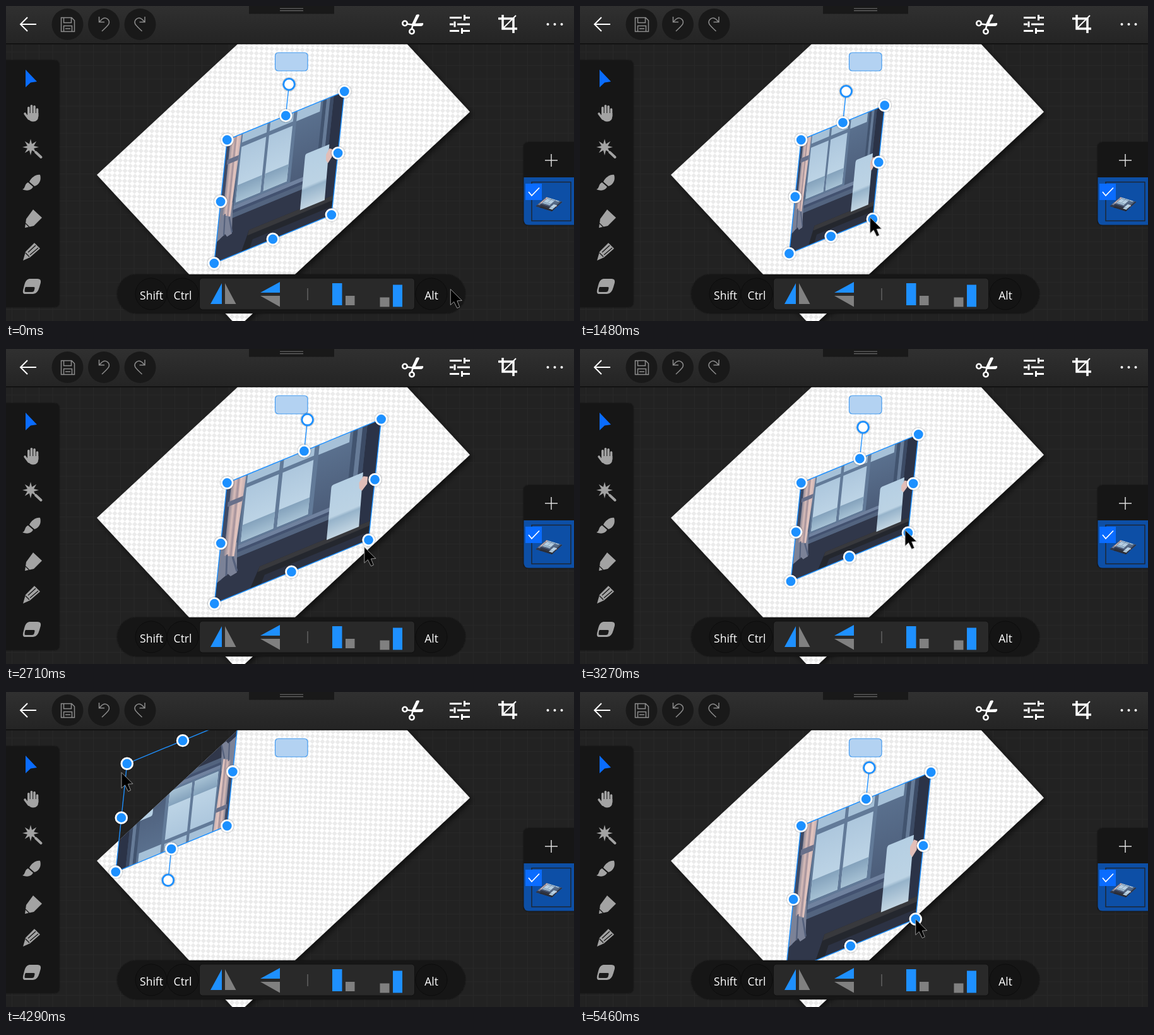
An HTML page for the animation above (5.61 s loop, 900x500 px).

```html
<!DOCTYPE html>
<html lang="en">
<head>
<meta charset="utf-8">
<title>Transform tool</title>
<style>
html, body { margin: 0; width: 100%; height: 100%; overflow: hidden; background: #222; }
svg { display: block; width: 900px; height: 500px; }
text { font: 17.5px "Open Sans", "Noto Sans", sans-serif; fill: #fff; text-anchor: middle; }
.line { fill: none; stroke: #fff; stroke-width: 3; }
.thin { fill: none; stroke: #8c8c8c; stroke-width: 1.5; }
.grey { fill: #a3a3a3; }
.blue { fill: #1e90ff; }
.mute { fill: #808080; }
.panel { fill: #191919; }
.dark { fill: none; stroke: #191919; stroke-width: 1.4; }
</style>
</head>
<body>
<svg viewBox="0 0 900 500">
<defs>
  <pattern id="grid" width="21.5" height="21.5" patternUnits="userSpaceOnUse" x="9" y="8">
    <rect width="21.5" height="21.5" fill="#222"/><path d="M0 .5H21.5M.5 0V21.5" stroke="#282828"/>
  </pattern>
  <pattern id="check" width="11.4" height="11.4" patternUnits="userSpaceOnUse" patternTransform="translate(144 268) rotate(-43)">
    <rect width="11.4" height="11.4" fill="#fff"/><path d="M0 0H5.7V11.4H11.4V5.7H0Z" fill="#ebebeb"/>
  </pattern>
  <linearGradient id="head" x2="0" y2="1"><stop stop-color="#303030"/><stop offset="1" stop-color="#242424"/></linearGradient>
  <linearGradient id="sky" x2="0" y2="1"><stop stop-color="#adc7dd"/><stop offset="1" stop-color="#c3d9e9"/></linearGradient>
  <linearGradient id="sea" x2="0" y2="1"><stop stop-color="#84a2bc"/><stop offset="1" stop-color="#a6c1d4"/></linearGradient>
  <linearGradient id="wall" x2="0" y2="1"><stop stop-color="#5c7391"/><stop offset=".6" stop-color="#4c5d79"/><stop offset="1" stop-color="#333b50"/></linearGradient>
  <linearGradient id="sheet" x2="0" y2="1"><stop stop-color="#b5cfe3"/><stop offset=".6" stop-color="#bcd3e4"/><stop offset=".66" stop-color="#96b3ca"/><stop offset="1" stop-color="#c2d5e2"/></linearGradient>
  <linearGradient id="pink"><stop stop-color="#8d8794"/><stop offset=".3" stop-color="#d9bdb9"/><stop offset=".5" stop-color="#a08f99"/><stop offset=".65" stop-color="#e6c7c0"/><stop offset="1" stop-color="#c3adb0"/></linearGradient>
  <filter id="shade" x="-20%" y="-20%" width="140%" height="140%"><feDropShadow dx="3" dy="4" stdDeviation="5" flood-opacity=".6"/></filter>
  <filter id="soft" x="-50%" y="-50%" width="200%" height="200%"><feDropShadow dx="0" dy="0" stdDeviation="1.3" flood-opacity=".55"/></filter>
  <path id="sheetEdge" d="M144 268L511.300 -73.700L735 168L367.700 509.700Z"/>
  <clipPath id="page"><use href="#sheetEdge"/></clipPath>
  <clipPath id="unit"><path d="M0 0H100V100H0Z"/></clipPath>
  <g id="art" clip-path="url(#unit)">
    <rect width="100" height="100" fill="url(#wall)"/>
    <path d="M0 68H100V100H0Z" fill="#30374a"/>
    <path d="M12 0H60V58H12Z" fill="#627a98"/>
    <path d="M13.500 0H34.500V7.500H13.500ZM37 0H57V7.500H37ZM60 0H80V8.500H60Z" fill="#a6c1d8"/>
    <path d="M13.500 11H34.500V56H13.500ZM37 11H57V56H37Z" fill="url(#sky)"/>
    <path d="M13.500 42H34.500V56H13.500ZM37 42H57V56H37Z" fill="url(#sea)"/>
    <path d="M12 58H73V61.500H12Z" fill="#70829f"/>
    <path d="M12 61.500H73V64H12Z" fill="#435270"/>
    <path d="M10 64H73V68H10Z" fill="#53647f"/>
    <path d="M82 0H85V66H82Z" fill="#42546f"/>
    <path d="M85 0H88V66H85Z" fill="#677c98"/>
    <path d="M88 0H91V70H88Z" fill="#3c4b65"/>
    <path d="M91 0H100V88H91Z" fill="#2b3347"/>
    <path d="M0 0H3V82H0Z" fill="#3d4a66"/>
    <path d="M0 55H11L13 81L9 82L7 79L0 83Z" fill="#7b8297"/>
    <path d="M3 0H12.500L10 66L3 62Z" fill="url(#pink)"/>
    <path d="M2 17H12L11.500 21H2Z" fill="#68708a"/>
    <path d="M9 66L13 80M5 62L6 80" fill="none" stroke="#55617c" stroke-width="1.200"/>
    <path d="M28 84H100V100H23Z" fill="#24272e"/>
    <path d="M28 84H100V88H27Z" fill="#38393d"/>
    <path d="M32 93H100V100H30Z" fill="#2c3243"/>
    <path d="M71 41.500Q71 39.500 72.500 39.500H91.500L92.500 85H71.500Z" fill="url(#sheet)"/>
    <path d="M89.500 47L92 43L95 45V51L92 55L90 52Z" fill="#e2beb8"/>
  </g>
  <g id="key"><circle r="25" fill="#141414" stroke="#0d0d0d"/></g>
</defs>

<rect width="900" height="500" fill="url(#grid)"/>
<use href="#sheetEdge" fill="url(#check)" filter="url(#shade)"/>
<rect x="426.500" y="74" width="51.500" height="29" rx="5" fill="#b3d2f2" stroke="#459cf0" stroke-width="1.200"/>

<g clip-path="url(#page)"><use href="#art" id="image"/></g>
<path id="frame" fill="none" stroke="#1e90ff" stroke-width="1.400"/>
<g id="knobs" filter="url(#soft)"></g>

<rect width="900" height="60" fill="url(#head)"/>
<path d="M0 60H900" stroke="#0c0c0c" stroke-width="1.600"/>
<path d="M385 0H520V12.500H385Z" class="panel"/>
<path d="M434 4H471M434 7.500H471" stroke="#777" stroke-width="1.200"/>
<path d="M48 29H23M34 18L23 29L34 40" class="line" style="stroke-width:2"/>
<g class="panel"><circle cx="97.500" cy="29" r="25"/><circle cx="155" cy="29" r="25"/><circle cx="212.500" cy="29" r="25"/></g>
<path class="thin" d="M87.500 18.500H104L108.500 23V40.500H87.500ZM91.500 18.500V26.500H103.500V18.500M91.500 40.500V31.500H104.500V40.500M94 36H102"/>
<path id="undo" class="thin" d="M147.500 17V25.500H156M147.500 25.500L152 21C158 16 165 22 163 28C162 31 157 35 152 40"/>
<use href="#undo" transform="matrix(-1 0 0 1 367.500 0)"/>
<g class="line" style="stroke-width:2.600">
  <circle cx="632" cy="27.500" r="3.700"/><circle cx="643" cy="40.500" r="3.700"/>
  <path d="M635.500 28.500L646 30M643 36.500L645 28"/>
</g>
<path d="M643 29L650 14Q655 12 655 15L647 31ZM643 28L661 27Q662 31 658 32L643 32Z" fill="#fff"/>
<path class="line" d="M703 18.500H722M728 18.500H735M703 29H709M715 29H735M703 39.500H718M724 39.500H735M726.500 14V23M711 24.500V33.500M722.500 35V44"/>
<path class="line" style="stroke-width:3.500" d="M780 20H804V43M787 14V36H810"/>
<path class="line" style="stroke-width:2" d="M787 36L808 15"/>
<g fill="#fff"><circle cx="858.500" cy="29" r="2"/><circle cx="869.500" cy="29" r="2"/><circle cx="880.500" cy="29" r="2"/></g>

<path class="panel" filter="url(#soft)" d="M-5 86H76Q84.500 86 84.500 94V470Q84.500 478 76 478H-5Z"/>
<path d="M31 101L49 120L39 121.500L31 129Z" fill="#0a6cff"/>
<g class="grey">
  <path d="M34 170H51.300V175Q51 183.500 43 183.500Q38 183.500 34 178Z"/>
  <path d="M35.800 174V161.500M40.400 172V158.500M45 173V159.500M49.500 175V164M30 171L36 179" stroke="#a3a3a3" stroke-width="3.600" stroke-linecap="round"/>
  <path id="burst"/>
  <path d="M47 232L55.500 240" stroke="#a3a3a3" stroke-width="4" stroke-linecap="round"/>
  <path d="M54 268C57 277 51 285 45 286L37 279C40 272 48 267 54 268Z"/>
  <path d="M35 280L43 287C40 293 33 294 26 291C31 290 29 282 35 280Z"/>
  <path d="M43 323L57 336L44 349L30 352L32 338Z"/>
  <path d="M45 376L54 385L38 399L27 404L31 390Z"/>
  <path d="M37 433H50Q56 433 55 439L53 446Q50 457 43 457H30Q26 457 27 451L29 443Q31 434 37 433Z"/>
</g>
<path class="dark" d="M31 345L37 351M35 391L47 380M38 395L51 384M31 392L37 398"/>
<path class="panel" d="M31 446H44Q46 446 45.500 448L44.500 452Q44 454 41 454H31Q29 454 29.500 452L30 448Z"/>

<path class="panel" filter="url(#soft)" d="M905 216H828Q820 216 820 224V340Q820 348 828 348H905Z"/>
<path d="M900 272H820.500V340Q821 347.500 828 347.500H900Z" fill="#0d4fa6"/>
<path d="M854 245H874M864 235V255" stroke="#ddd" stroke-width="1.500"/>
<rect x="833" y="279.500" width="62" height="61.500" fill="none" stroke="#1d2735" stroke-width="1.500"/>
<use href="#art" transform="matrix(.26 .08 -.17 .15 856 303)"/>
<rect x="823" y="282" width="26" height="26" fill="#0a6cff"/>
<path class="line" style="stroke-width:1.800" d="M828 295L833 301L845 288.500"/>

<rect class="panel" filter="url(#soft)" x="176" y="426" width="552" height="62" rx="31"/>
<use href="#key" x="230" y="457"/><use href="#key" x="280" y="457"/><use href="#key" x="674" y="457"/>
<rect x="306.500" y="432" width="341" height="50" rx="5" fill="#292929" stroke="#101010"/>
<text x="230.500" y="466">Shift</text><text x="280" y="466">Ctrl</text><text x="674" y="466">Alt</text>
<path class="blue" d="M324 473H342V440ZM434 438V455H403ZM517 440H532.500V475H517ZM613 442.500H628V477.500H613Z"/>
<path class="mute" d="M347 440V473H364.500ZM403 460H434V477.500ZM538 460H552.500V475H538ZM592.500 462.500H607.500V477.500H592.500Z"/>
<path d="M478 448V467" stroke="#666" stroke-width="1.400"/>

<path id="pointer" d="M0 0V25L5.500 20L10.500 30L14.500 28.300L10.500 18.500L18 18Z" stroke="#aaa" stroke-width=".9"/>
</svg>

<script>
const $ = id => document.getElementById(id);
const LOOP = 5610, STEP = 78, LEAD = 30, REACH = 50;
const ORIGIN = [350.3, 212.5], U = [186, -77], V = [-20.5, 196];

// Turning points of the drag: time, width, height (negative is mirrored)
const KEYS = [
  [700, 1, 1],
  [858, 1.059, 1.069],
  [1090, 1.21, 1.22],
  [1482, 0.712, 0.921],
  [1720, 0.57, 0.76],
  [2184, 1.215, 0.711],
  [2340, 1.48, 0.62],
  [2530, 1.48, 0.62],
  [2800, 1.25, 1.05],
  [3276, 1, 0.797],
  [4050, -0.72, -1.2],
  [4290, -0.949, -0.877],
  [4370, -1.04, -0.72],
  [5460, 1.107, 1.19]
];
const LAST = KEYS.length - 1;

const clamp = x => Math.max(0, Math.min(1, x));
const snap = t => Math.floor(t / STEP + 0.25) * STEP;
const slope = (i, c) => (KEYS[i + 1][c] - KEYS[i][c]) / (KEYS[i + 1][0] - KEYS[i][0]);

// Cubic tangents that never overshoot a key
function tangent(i, c) {
  if (i < 1 || i >= LAST) return 0;
  const a = slope(i - 1, c), b = slope(i, c);
  return a * b > 0 ? 2 * a * b / (a + b) : 0;
}

function size(t) {
  let i = 0;
  while (i < LAST - 1 && KEYS[i + 1][0] <= t) i++;
  const [from, to] = [KEYS[i], KEYS[i + 1]], h = to[0] - from[0];
  const x = clamp((t - from[0]) / h), y = 1 - x;
  return [1, 2].map(c => from[c] * y * y * (1 + 2 * x) + to[c] * x * x * (3 - 2 * x)
    + h * x * y * (tangent(i, c) * y - tangent(i + 1, c) * x));
}

const point = ([w, h], s, r) => ORIGIN.map((o, k) => o + U[k] * w * s + V[k] * h * r);

function knob(fill, stroke) {
  const el = document.createElementNS("http://www.w3.org/2000/svg", "circle");
  const style = { r: 8.8, fill, stroke, "stroke-width": 2.8 };
  for (const k in style) el.setAttribute(k, style[k]);
  return $("knobs").appendChild(el);
}

// Eight knobs on the rim of a 3 by 3 grid
const knobs = [];
for (const s of [0, .5, 1]) {
  for (const r of [0, .5, 1]) {
    if (s !== .5 || r !== .5) knobs.push({ el: knob("#1e90ff", "#fff"), s, r });
  }
}
const spinner = knob("#fff", "#1e90ff");

function place(el, [x, y]) {
  el.setAttribute("cx", x);
  el.setAttribute("cy", y);
}

function draw(t) {
  const now = size(t), [w, h] = now;
  const at = (s, r) => point(now, s, r);
  const axes = [...U.map(n => n * w / 100), ...V.map(n => n * h / 100)];
  $("image").setAttribute("transform", `matrix(${[...axes, ...ORIGIN]})`);

  const top = at(.5, 0), turn = REACH / Math.hypot(...V) * (h < 0 ? -1 : 1);
  const spin = top.map((n, k) => n - V[k] * turn);
  const corners = [at(0, 0), at(1, 0), at(1, 1), at(0, 1)];
  $("frame").setAttribute("d", `M${corners.join("L")}ZM${top}L${spin}`);
  knobs.forEach(({ el, s, r }) => place(el, at(s, r)));
  place(spinner, spin);

  // The pointer glides in, then runs slightly ahead of the corner it drags
  const [x, y] = point(size(t + LEAD), 1, 1);
  const away = (1 + Math.cos(Math.PI * clamp(t / 610))) / 2;
  $("pointer").setAttribute("transform", `translate(${x + 188.5 * away} ${y + 118 * away})`);
}

const rays = Array.from({ length: 16 }, (_, i) => {
  const a = i * Math.PI / 8, r = i % 2 ? 5.5 : 13;
  return [39 + r * Math.sin(a), 224 - r * Math.cos(a)];
});
$("burst").setAttribute("d", `M${rays.join("L")}Z`);

const start = performance.now();
function tick() {
  draw(snap((performance.now() - start) % LOOP));
  requestAnimationFrame(tick);
}
tick();
</script>
</body>
</html>
```
